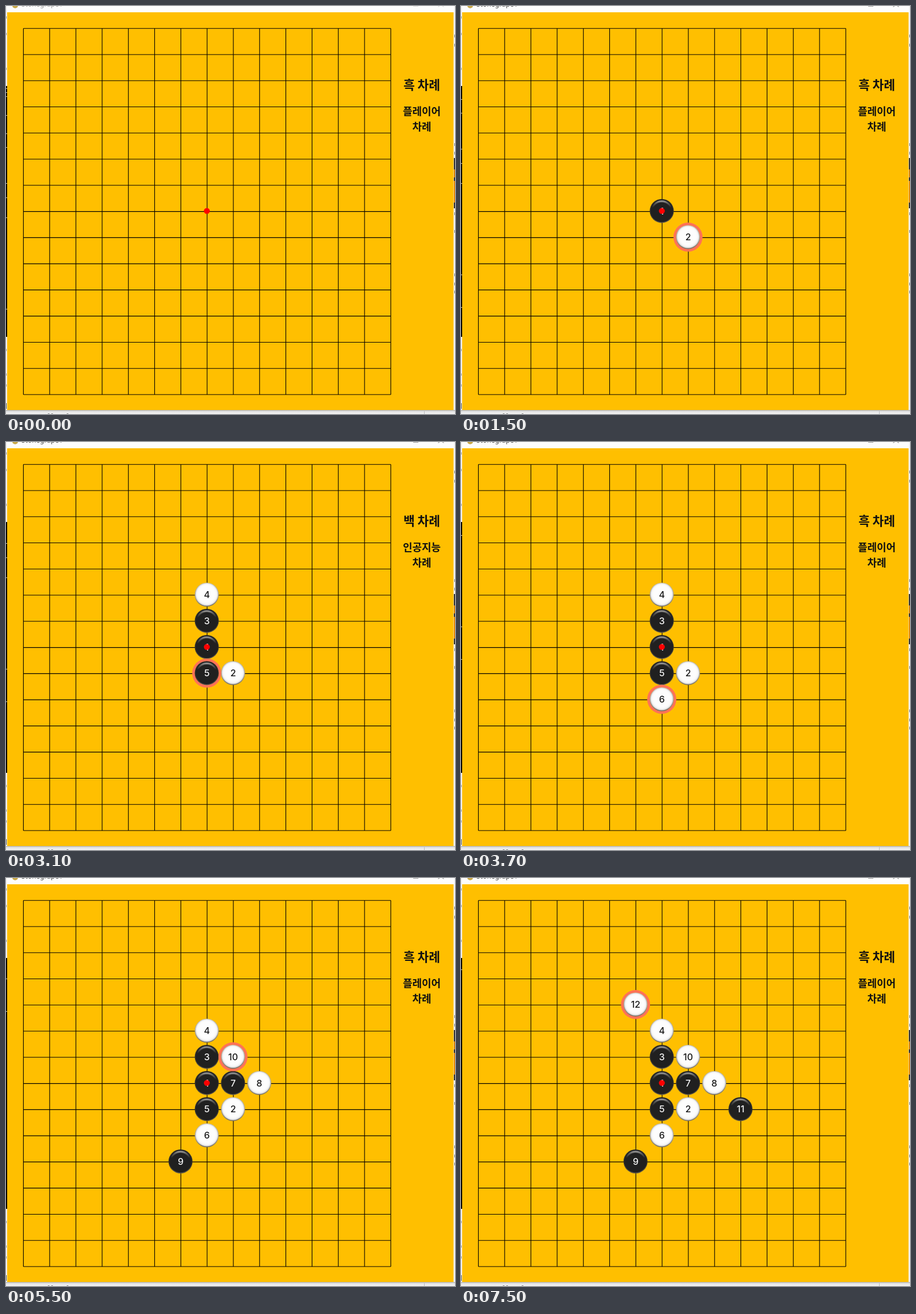
Write an HTML page with a canvas that moves like this. It is 784x714 px and loops after 8 s.

```html
<!DOCTYPE html>
<html lang="ko">
<head>
<meta charset="utf-8">
<style>
html, body { margin: 0; width: 100%; height: 100%; overflow: hidden; background: #fff; }
canvas { display: block; }
</style>
</head>
<body>
<canvas id="stage" width="784" height="714"></canvas>
<script>
const g = document.getElementById('stage').getContext('2d');
const LOOP = 8000;
const HANGUL = '"Noto Sans CJK KR", "Noto Sans CJK JP", "Noto Sans CJK", sans-serif';
// [time, column, row]; black and white alternate
const moves = [
  [900, 7, 7], [1500, 8, 8], [1900, 7, 6], [2300, 7, 5],
  [3100, 7, 8], [3600, 7, 9], [4000, 8, 7], [4500, 9, 7],
  [4900, 6, 10], [5400, 8, 6], [6900, 10, 8], [7400, 6, 4]
];
const logLines = [84, 91, 98, 131, 163, 187, 250, 275, 310, 470, 527];
// centres of the grid lines
const gridX = i => 30.4 + 45.82 * i;
const gridY = i => 39.2 + 45.77 * i;

function rect(x, y, w, h, color) {
  g.fillStyle = color;
  g.fillRect(x, y, w, h);
}

function disc(x, y, r, fill) {
  g.fillStyle = fill;
  g.beginPath();
  g.arc(x, y, r, 0, 7);
  g.fill();
}

function text(s, x, y, font, color, align = 'center', baseline = 'alphabetic') {
  g.font = font;
  g.textAlign = align;
  g.textBaseline = baseline;
  g.fillStyle = color;
  g.fillText(s, x, y);
}

function hangul(s, y, size) {
  text(s, 726, y, `700 ${size}px ${HANGUL}`, '#111', 'center', 'middle');
}

function fade(gradient, ...stops) {
  stops.forEach(([at, color]) => gradient.addColorStop(at, color));
  return gradient;
}

function desktop(replies) {
  rect(0, 0, 784, 714, '#f4f4f4');
  rect(0, 140, 2, 439, '#000');
  const scroll = replies ? 73.4 * (replies - 1) : -60;
  for (const y of logLines) {
    const top = Math.round(y - scroll);
    if (top >= 140 && top < 579) rect(0, top, 2, 1, '#ccc');
  }
  for (const y of [18, 47, 108, 600, 643, 662]) rect(0, y, 1, 4, '#999');
  rect(0, 695, 1, 10, '#555');
  rect(782, 266, 2, 88, '#333');
  rect(782, 286, 2, 14, '#d98200');
  rect(782, 306, 2, 38, '#e88a00');
  for (const y of [50, 66, 240, 255, 361, 392, 468, 484, 498]) rect(783, y, 1, 5, '#777');
  rect(0, 707, 784, 7, fade(g.createLinearGradient(0, 707, 0, 714), [0, '#aaa'], [.3, '#dedede'], [1, '#f6f6f6']));
  rect(730, 709, 1, 5, '#bbb');
  for (const x of [73, 79, 106]) rect(x, 713, 3, 1, '#888');
}

function titleBar(active) {
  rect(2, 0, 780, 12, '#fdfdfd');
  disc(16, -1, 5, '#c9a94a');
  text('Stonegrape1', 27, 1, '12px "Noto Sans", sans-serif', active ? '#444' : '#999', 'left');
  rect(711, 0, 9, 1, active ? '#999' : '#ddd');
  g.strokeStyle = active ? '#333' : '#bbb';
  g.lineWidth = 1;
  g.beginPath();
  g.moveTo(755, 1.5);
  g.lineTo(759.5, -3);
  g.lineTo(764, 1.5);
  g.stroke();
}

function board() {
  rect(2, 11, 779.5, 696, '#ffbf00');
  g.strokeStyle = '#000';
  g.lineWidth = 1.1;
  g.beginPath();
  for (let i = 0; i < 15; i++) {
    g.moveTo(gridX(i), gridY(0));
    g.lineTo(gridX(i), gridY(14));
    g.moveTo(gridX(0), gridY(i));
    g.lineTo(gridX(14), gridY(i));
  }
  g.stroke();
}

function stone(x, y, n) {
  const black = n % 2;
  const rim = g.createLinearGradient(0, y - 21, 0, y + 21);
  if (black) {
    disc(x, y, 21, fade(rim, [0, '#2a2a2a'], [.6, '#35322a'], [1, '#5f584a']));
    disc(x, y, 19.5, '#202020');
    const shine = g.createLinearGradient(0, y - 19, 0, y - 6);
    disc(x, y - .5, 18, fade(shine, [0, '#aaa'], [.4, '#606060'], [1, '#202020']));
    disc(x, y + 1, 17, fade(g.createRadialGradient(x, y + 1, 12, x, y + 1, 17),
      [0, '#202020'], [.7, '#202020'], [1, 'rgba(32,32,32,0)']));
  } else {
    disc(x, y, 21, fade(rim, [0, '#c5bda8'], [.6, '#a39c8c'], [1, '#777166']));
    disc(x, y - .5, 19.8, fade(g.createRadialGradient(x, y - 1.5, 14, x, y - .5, 20),
      [0, '#fdfdfd'], [.55, '#f8f8f8'], [1, '#d0d0d0']));
  }
  text(n, x + .2, y + 6, '500 16px Inter, sans-serif', black ? '#f4f4f4' : '#181818');
}

function draw(t) {
  const played = moves.filter(m => t >= m[0]).length;
  const whiteTurn = played % 2;
  desktop(played >> 1);
  titleBar(played > 0);
  board();
  moves.slice(0, played).forEach(([, col, row], i) => {
    const x = gridX(col) - .6, y = gridY(row) - .9;
    if (i === played - 1) disc(x, y, 25.4, '#ff7256');
    stone(x, y, i + 1);
  });
  disc(350.7, 358.6, 5.2, '#f00');
  hangul(whiteTurn ? '백 차례' : '흑 차례', 138, 21.5);
  hangul(whiteTurn ? '인공지능' : '플레이어', 184, 18);
  hangul('차례', 211.5, 18);
}

const start = performance.now();
function tick() {
  draw((performance.now() - start) % LOOP);
  requestAnimationFrame(tick);
}
tick();
</script>
</body>
</html>
```
